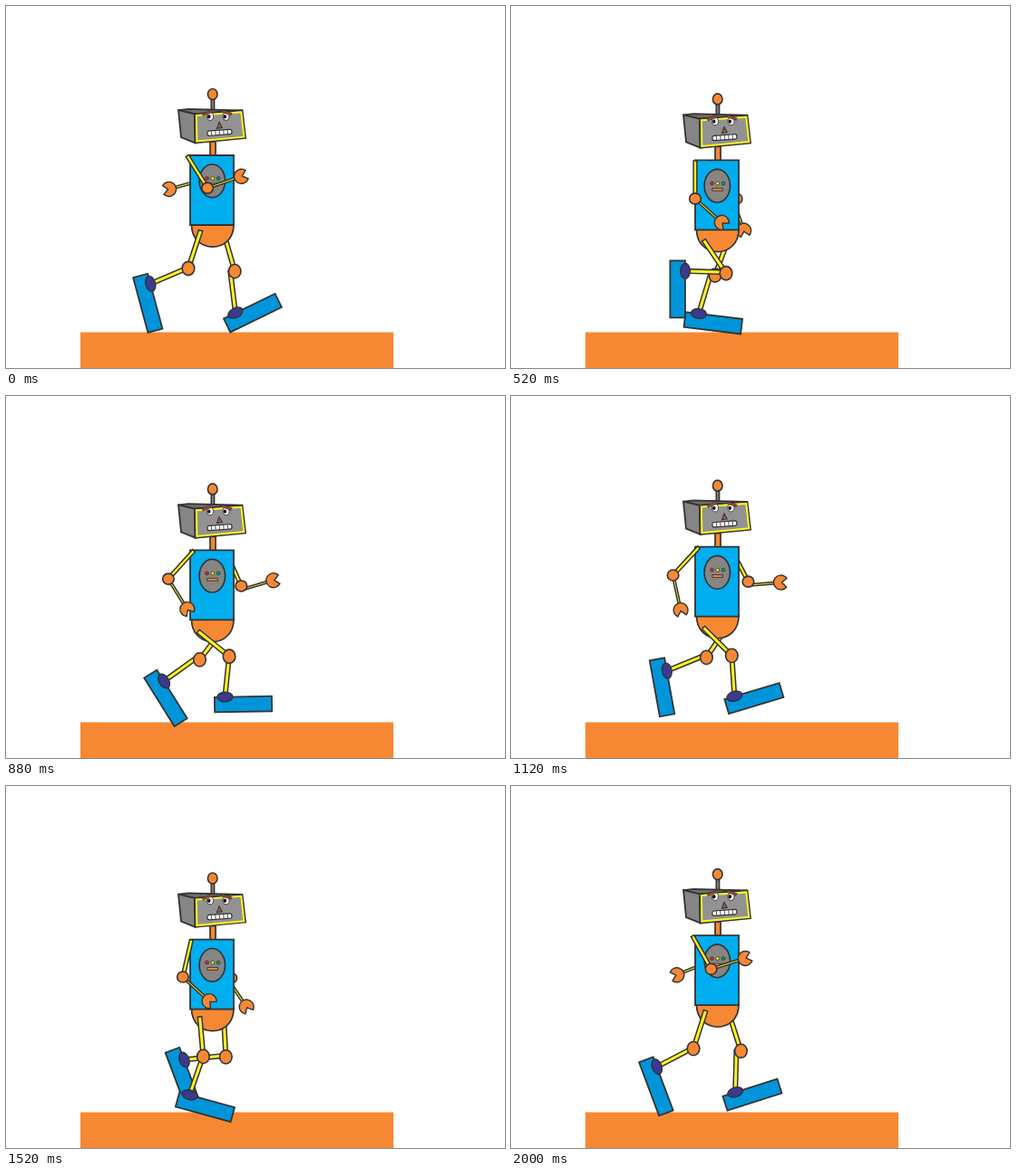
An HTML page with a canvas for the animation above (2040 ms loop, 550 by 400 pixels).

```html
<!DOCTYPE html>
<html lang="en">
<head>
<meta charset="utf-8">
<title>Walking robot</title>
<style>
  html, body { margin: 0; width: 100%; height: 100%; overflow: hidden; background: #fff; }
  canvas { display: block; width: 550px; height: 400px; }
</style>
</head>
<body>
<canvas id="stage"></canvas>
<script>
const LOOP = 2040, STEP = 40, INK = '#333';
const ORANGE = '#f78833', YELLOW = '#fff21f', BLUE = '#00aeef', SHOE = '#0095da', NAVY = '#3b3a90';

const canvas = document.getElementById('stage');
const ctx = canvas.getContext('2d');
const ratio = window.devicePixelRatio || 1;
canvas.width = 550 * ratio;
canvas.height = 400 * ratio;

// Key poses. Legs: thigh, shin, foot; arms: upper, fore. All in degrees, clockwise from right.
const poses = [
  { at: 0,    bob: 0,   nearLeg: [108, 158, 75],  farLeg: [74, 89, -26],   nearArm: [58, -19], farArm: [134, 171] },
  { at: 240,  bob: 6.8, nearLeg: [90, 179, 106],  farLeg: [74, 117, 0],    nearArm: [41, -38], farArm: [134, 171] },
  { at: 520,  bob: 5.4, nearLeg: [56, 183, 90],   farLeg: [110, 113, 7],   nearArm: [90, 42],  farArm: [82, 77] },
  { at: 880,  bob: 5.4, nearLeg: [39, 96, -1],    farLeg: [127, 149, 58],  nearArm: [132, 58], farArm: [66, -10] },
  { at: 1080, bob: 0.3, nearLeg: [41, 84, -20],   farLeg: [126, 155, 76],  nearArm: [134, 75], farArm: [62, 0] },
  { at: 1320, bob: 8.3, nearLeg: [63, 97, 0],     farLeg: [114, 193, 99],  nearArm: [126, 91], farArm: [65, 9] },
  { at: 1720, bob: 0.8, nearLeg: [107, 122, 31],  farLeg: [60, 159, 40],   nearArm: [80, -6],  farArm: [100, 115] }
];
poses.push({ ...poses[0], at: LOOP });

const mix = (a, b, k) => a + (b - a) * k;

function poseAt(t) {
  const i = poses.findIndex(p => p.at > t);
  const a = poses[i - 1], b = poses[i], k = (t - a.at) / (b.at - a.at);
  const turn = limb => a[limb].map((deg, n) => mix(deg, b[limb][n], k) * Math.PI / 180);
  return {
    bob: mix(a.bob, b.bob, k),
    nearLeg: turn('nearLeg'), farLeg: turn('farLeg'),
    nearArm: turn('nearArm'), farArm: turn('farArm')
  };
}

const along = ([x, y], angle, length) => [x + Math.cos(angle) * length, y + Math.sin(angle) * length];

function paint(fill, width = 1.7) {
  ctx.fillStyle = fill;
  ctx.fill();
  if (!width) return;
  ctx.strokeStyle = INK;
  ctx.lineWidth = width;
  ctx.stroke();
}

function trace(points) {
  ctx.beginPath();
  points.forEach(p => ctx.lineTo(p[0], p[1]));
  ctx.closePath();
}

function poly(points, fill, width) {
  trace(points);
  paint(fill, width);
}

function oval(x, y, rx, ry, fill, width, tilt = 0) {
  ctx.beginPath();
  ctx.ellipse(x, y, rx, ry, tilt, 0, 7);
  paint(fill, width);
}

function box(x, y, w, h, fill, width) {
  ctx.beginPath();
  ctx.rect(x, y, w, h);
  paint(fill, width);
}

function placed([x, y], angle, drawing) {
  ctx.save();
  ctx.translate(x, y);
  ctx.rotate(angle);
  drawing();
  ctx.restore();
}

function bar(a, b, w) {
  const dx = b[0] - a[0], dy = b[1] - a[1];
  placed(a, Math.atan2(dy, dx), () => box(0, -w / 2, Math.hypot(dx, dy), w, YELLOW, 1.5));
}

function leg(hip, [thigh, shin, foot], length, heel, shift) {
  const knee = along(hip, thigh, 44);
  const ankle = along(knee, shin, length);
  bar(hip, knee, 4.5);
  placed(ankle, foot, () => box(-heel, 0.1, 63, 16.6, SHOE, 1.8));
  bar([knee[0] + shift, knee[1] - 1], ankle, 4.5);
  oval(knee[0], knee[1], 6.8, 7.6, ORANGE, 1.6);
  oval(ankle[0], ankle[1], 8.6, 5.3, NAVY, 1.4, foot);
}

function arm(shoulder, [upper, fore], upperLength, foreLength, gap) {
  const elbow = along(shoulder, upper, upperLength);
  const hand = along(elbow, fore, foreLength);
  const start = along(elbow, fore + Math.PI / 2, gap);
  bar(shoulder, elbow, 3.8);
  bar(start, hand, 2.4);
  oval(elbow[0], elbow[1], 6.3, 6, ORANGE, 1.6);
  placed(hand, fore, () => {
    ctx.beginPath();
    ctx.arc(0, 0, 8, 0.65, Math.PI * 2 - 0.65);
    ctx.lineTo(1, 0);
    ctx.closePath();
    paint(ORANGE, 1.4);
  });
}

function body() {
  box(225, 150, 6, 16, ORANGE);
  ctx.beginPath();
  ctx.moveTo(204.5, 241);
  ctx.bezierCurveTo(204, 274.5, 251.5, 274.5, 251, 241);
  ctx.closePath();
  paint(ORANGE);
  box(203, 165, 48, 77, BLUE, 1.8);
  oval(227.3, 193.3, 14.2, 18.3, '#858585', 1.6);
  ['#ee1c3b', '#fff21f', '#00a651'].forEach((c, i) => oval(221.5 + i * 6.3, 190.5, 1.9, 1.9, c, 0.8));
  box(221.8, 196, 11.6, 2.8, ORANGE, 0.9);
}

function brow(x1, y1, x2, y2) {
  for (const [color, w] of [[INK, 3.2], ['#a8482a', 1.8]]) {
    ctx.beginPath();
    ctx.moveTo(x1, y1);
    ctx.lineTo(x2, y2);
    ctx.strokeStyle = color;
    ctx.lineWidth = w;
    ctx.stroke();
  }
}

function head() {
  box(226.2, 101, 3.4, 14, '#808080', 1.5);
  oval(227.7, 97.5, 5.3, 6, ORANGE, 1.6);
  poly([[190, 115], [201, 113.8], [260.5, 115.3], [208, 119.3]], '#6e6e6e');
  poly([[190, 115], [208, 119.3], [208.6, 151.3], [193, 145]], '#858585', 1.8);
  poly([[208, 119.3], [260.5, 115.3], [264, 146], [208.6, 151.3]], '#929292', 1.8);
  trace([[209.9, 120.9], [259.3, 117.3], [262.3, 144.7], [210.4, 149.5]]);
  ctx.strokeStyle = YELLOW;
  ctx.lineWidth = 2;
  ctx.stroke();

  for (const x of [225, 242.5]) {
    oval(x, 122, 3.5, 4.3, '#fff', 0.9);
    oval(x - 1.2, 122.2, 1.7, 2.2, '#111', 0);
  }
  brow(216.5, 120.3, 227.5, 116);
  brow(238.5, 116.2, 249, 119.8);
  poly([[235, 128.3], [238.2, 134.3], [232.4, 135.2]], '#a8603c', 1.1);

  placed([235.4, 139.8], -0.07, () => {
    ctx.beginPath();
    ctx.roundRect(-13.6, -2.7, 27.2, 5.4, 2.5);
    paint('#fff', 1.2);
    ctx.beginPath();
    for (let x = -9; x <= 10; x += 4.5) {
      ctx.moveTo(x, -2.7);
      ctx.lineTo(x, 2.7);
    }
    ctx.lineWidth = 0.8;
    ctx.stroke();
  });
}

function draw(t) {
  const { bob, nearLeg, farLeg, nearArm, farArm } = poseAt(t);
  ctx.setTransform(ratio, 0, 0, ratio, 0, 0);
  ctx.miterLimit = 3;
  ctx.fillStyle = '#fff';
  ctx.fillRect(0, 0, 550, 400);
  box(82, 360.5, 345, 40, ORANGE, 0);

  ctx.translate(0, bob);
  arm([243, 168], farArm, 40, 36, 4);
  leg([240, 250.8], farLeg, 46, 14.5, -5);
  body();
  head();
  // The near hip and shoulder slide a little as the limb swings.
  const hipSwing = Math.cos(nearLeg[0]), armSwing = Math.cos(nearArm[0]);
  leg([213.8 - 2.5 * hipSwing, 250 + 6 * hipSwing], nearLeg, 45, 11.5, 0);
  arm([203 - 6 * armSwing, 165.5], nearArm, 42, 39.5, 0);
}

const start = performance.now();
function tick() {
  const t = Math.max(0, performance.now() - start) % LOOP;
  draw(Math.floor(t / STEP) * STEP);
  requestAnimationFrame(tick);
}
tick();
</script>
</body>
</html>
```
